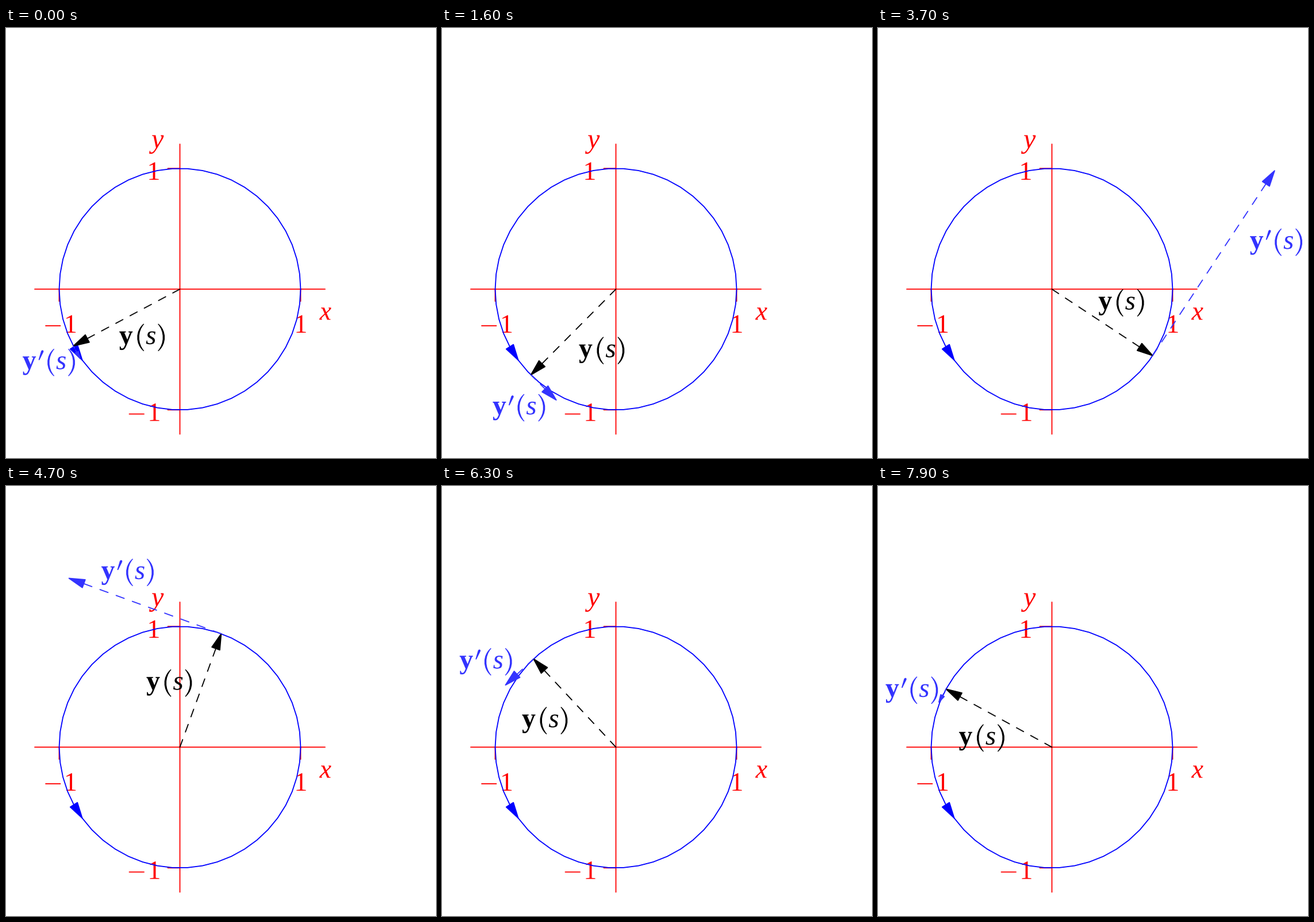
These frames come from a looping animation (748x748 px, 8000 ms). A matplotlib script:

```python
import numpy as np
import matplotlib.pyplot as plt
from matplotlib.animation import FuncAnimation
from matplotlib.patches import PathPatch, Polygon
from matplotlib.path import Path
from matplotlib.textpath import TextPath

plt.rcParams["lines.scale_dashes"] = False

SIZE, DPI = 748, 100
PX = 72 / DPI                  # points per pixel
O = np.array([302.5, 454.3])   # origin of the plot, y pointing down
R = 210
LW = 1.83
HEAD = 15 * LW
DASH = 8 * LW
MARGIN = 12
RED, BLUE, SOFT = (1, 0, 0), (0, 0, 1), (0.2, 0.2, 1)

fig = plt.figure(figsize=(SIZE / DPI, SIZE / DPI), dpi=DPI, facecolor="white")
ax = fig.add_axes([0, 0, 1, 1])
ax.set(xlim=(0, SIZE), ylim=(SIZE, 0))
ax.axis("off")


def glyph(ch, size, base, left=None, center=None, **style):
    """Outline of one letter, placed by its ink and its baseline."""
    p = TextPath((0, 0), ch, size=size, prop=dict(family="Liberation Serif", **style))
    v = p.vertices * [1, -1]
    x = p.get_extents()
    dx = left - x.x0 if center is None else center - (x.x0 + x.x1) / 2
    return Path(v + [dx, base], p.codes)


def paren(x, side):
    """Thin crescent, 12 wide and 48 high; side 1 opens right, -1 left."""
    v = np.array([(11.2, -24), (-3.7, -11.5), (-3.7, 11.5), (11.2, 24), (12, 23),
                  (0.7, 10.5), (0.7, -10.5), (12, -23), (11.2, -24)], float)
    if side < 0:
        v[:, 0] = 12 - v[:, 0]
    codes = [Path.MOVETO] + [Path.CURVE4] * 3 + [Path.LINETO] + [Path.CURVE4] * 3 + [Path.CLOSEPOLY]
    return Path(v + [x, 0], codes)


def prime(x):
    v = np.array([(0, -4.5), (4.6, -20), (6.6, -21.6), (8.8, -20.4), (8.6, -18.2),
                  (1.6, -4), (0, -4.5)])
    return Path(v + [x, 0], [Path.MOVETO] + [Path.LINETO] * 5 + [Path.CLOSEPOLY])


def func_label(primed):
    """y(s) or y'(s), centred on its ink."""
    shift = 12 if primed else 0
    width = 79 + shift
    parts = [glyph("y", 48, 11.5, left=0, weight="bold"),
             paren(31 + shift, 1),
             glyph("s", 47, 11.5, left=46.5 + shift, style="italic"),
             paren(67 + shift, -1)]
    if primed:
        parts.append(prime(27.5))
    p = Path.make_compound_path(*parts)
    return Path(p.vertices - [width / 2, 0], p.codes)


def fill(path, color, z):
    return ax.add_patch(PathPatch(path, fc=color, lw=0, zorder=z))


def stroke(x, y, color, z):
    return ax.plot(x, y, color=color, lw=LW * PX, zorder=z, snap=False,
                   solid_capstyle="round", dash_capstyle="round")[0]


def head_points(tip, u, size):
    n = np.array([-u[1], u[0]]) * size * np.tan(np.pi / 12)
    base = tip - u * size
    return np.array([tip, base + n, base - n])


def head(points, color, z):
    return ax.add_patch(Polygon(points, fc=color, ec=color, lw=LW * PX,
                                joinstyle="round", zorder=z))


class Arrow:
    """Dashed arrow with a label beside it."""

    def __init__(self, color, z, label, box, nudge, pos):
        self.line = stroke([], [], color, z)
        self.head = head(np.zeros((3, 2)), color, z)
        self.label, self.box, self.nudge, self.pos = label, np.array(box), nudge, pos
        self.text = fill(label, color, z + 1)

    def place(self, start, vec, align):
        length = np.hypot(*vec)
        u = vec / length
        size = min(HEAD, length / 2)
        body = length - size
        end = start + u * body
        # stretch the pattern so that the line ends with a whole dash
        n = max(int((body - DASH) / (2 * DASH) + 0.5), 1)
        dash = body / (2 * n + 1) * PX
        self.line.set_data([start[0], end[0]], [start[1], end[1]])
        self.line.set_dashes([dash, dash])
        self.head.set_xy(head_points(start + vec, u, size))
        center = (start + vec * self.pos + align * MARGIN
                  + self.box / 2 * align / np.abs(align).max() + self.nudge)
        self.text.set_path(Path(self.label.vertices + center, self.label.codes))

    def artists(self):
        return [self.line, self.head, self.text]


# axes and ticks
stroke([50, 555], [O[1]] * 2, RED, 1)
stroke([O[0]] * 2, [202, 706.5], RED, 1)
for d in (-R, R):
    stroke([O[0] + d] * 2, [O[1], O[1] + 21], RED, 1)
    stroke([O[0] - 21, O[0]], [O[1] + d] * 2, RED, 1)

fill(glyph("x", 46, 507.5, left=545, style="italic"), RED, 2)
fill(glyph("y", 48, 208.5, left=249, style="italic"), RED, 2)
for x, base, negative in [(257.5, 264, 0), (513.5, 530, 0), (113, 530, 1), (258.5, 683.5, 1)]:
    fill(glyph("1", 46, base, center=x), RED, 2)
    if negative:
        stroke([x - 44, x - 18.5], [base - 12] * 2, RED, 2)

# circle with its direction mark
t = np.linspace(0, 2 * np.pi, 51)
stroke(O[0] + R * np.cos(t), O[1] - R * np.sin(t), BLUE, 3)


def on_circle(a):
    return O + R * np.array([np.cos(a), -np.sin(a)])


mark = on_circle(1.2 * np.pi)
back = mark - on_circle(1.2 * np.pi - HEAD / R)
head(head_points(mark, back / np.hypot(*back), HEAD), BLUE, 3)

radius = Arrow("black", 4, func_label(False), (84, 48), (-1.2, 0), 0.5)
speed = Arrow(SOFT, 6, func_label(True), (97.5, 48), (-0.8, 0), 0.7)


def update(k):
    s = -4 + k / 10
    q = 1 + s * s
    out = np.array([(1 - s * s) / q, -2 * s / q])
    tangent = np.array([out[1], -out[0]])
    v = 2 / q
    radius.place(O, R * out, tangent)
    speed.place(O + R * out, R * v * tangent, v * out)
    return radius.artists() + speed.artists()


anim = FuncAnimation(fig, update, frames=80, interval=100, repeat=True, blit=False)
plt.show()
```
